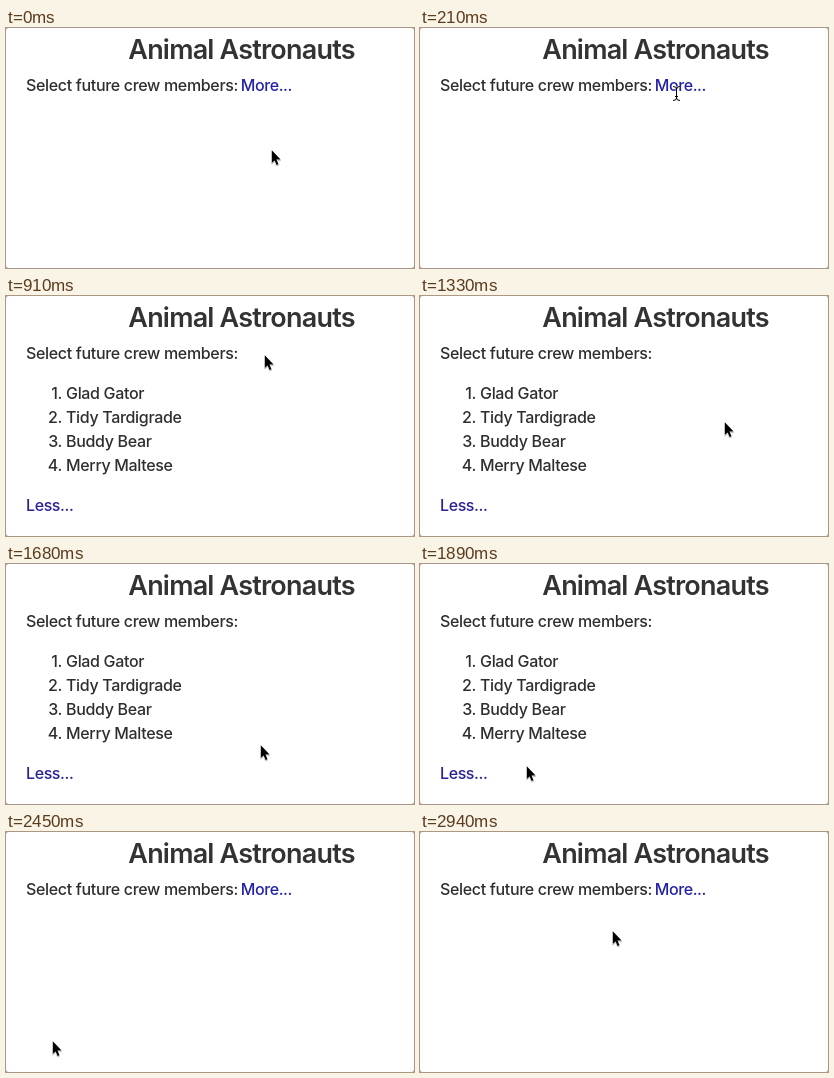
These frames come from a looping animation (408 by 240 pixels, 3.01 s). An HTML page:

```html
<!DOCTYPE html>
<html lang="en">
<head>
<meta charset="utf-8">
<title>Animal Astronauts</title>
<style>
  html, body { margin: 0; width: 100%; height: 100%; overflow: hidden; background: #a6a6a6; }
  svg { display: block; width: 100vw; height: 100vh; }
  text {
    font: 450 16px Inter, "Liberation Sans", sans-serif;
    font-optical-sizing: none;
    letter-spacing: -.33px;
    fill: #2e2e2e;
    white-space: pre;
  }
  .title { font-size: 27px; font-weight: 600; letter-spacing: -.8px; text-anchor: middle; fill: #333; }
  .number { text-anchor: end; }
  .link { fill: #2222a6; letter-spacing: -.4px; }
  #less { fill: #2a2394; }
  #arrow { filter: drop-shadow(0 1px .7px rgba(0, 0, 0, .25)); }
  #ring { fill: none; stroke: #777; stroke-width: 1.5; }
</style>
</head>
<body>
<svg viewBox="0 0 408 240">
  <defs>
    <path id="caret" d="M-3.5 -7Q0 -7 0 -4.5Q0 -7 3.5 -7M0 -4.5V4.5M-3.5 7Q0 7 0 4.5Q0 7 3.5 7M-1.5 3H1.5"/>
  </defs>
  <rect width="408" height="240" rx="3" fill="#fff"/>
  <text class="title" x="235.5" y="31">Animal Astronauts</text>
  <text x="20" y="63">Select future crew members:</text>
  <text class="link" id="more" x="234.7" y="63">More...</text>
  <g id="details">
    <g id="list"></g>
    <text class="link" id="less" x="20" y="215">Less...</text>
  </g>
  <g id="pointer">
    <circle id="ring" r="16.5"/>
    <path id="arrow" d="M.8 1.3V14L3.6 11.4 5.6 16 7.5 15.2 5.5 10.6H9.6Z"
          stroke="#fff" stroke-linejoin="round" paint-order="stroke"/>
    <g id="beam" fill="none" transform="translate(.5 -.5)">
      <use href="#caret" stroke="#fff" stroke-width="2" stroke-opacity=".6"/>
      <use href="#caret" stroke="#000"/>
    </g>
  </g>
</svg>
<script>
const LOOP = 3010, TICK = 70;
const $ = id => document.getElementById(id);

$('list').innerHTML = ['Glad Gator', 'Tidy Tardigrade', 'Buddy Bear', 'Merry Maltese']
  .map((name, i) => {
    const y = 103 + 24 * i;
    return `<text class="number" x="56" y="${y}">${i + 1}.</text><text x="60" y="${y}">${name}</text>`;
  }).join('');

const easeOut = power => p => 1 - (1 - p) ** power;
const linear = p => p;

// Each move follows a quadratic curve and rests at its end until the next one.
const moves = [
  { start: 0, end: 210, from: [265, 121], bend: [260, 92], to: [256, 66], ease: easeOut(1.4) },
  { start: 280, end: 420, from: [256, 66], bend: [257, 63], to: [258, 60], ease: linear },
  { start: 910, end: 910, from: [258, 58], bend: [258, 58], to: [258, 58], ease: linear },
  { start: 1120, end: 1470, from: [258, 58], bend: [302, 100], to: [320, 172], ease: p => p * p * (3 - 2 * p) },
  { start: 1610, end: 2100, from: [320, 172], bend: [183, 188], to: [46, 210], ease: easeOut(1.8) },
  { start: 2450, end: 2450, from: [46, 208], bend: [46, 208], to: [46, 208], ease: linear },
  { start: 2660, end: 2940, from: [46, 208], bend: [112, 165], to: [192, 98], ease: p => p ** 1.3 }
];

function pointerAt(t) {
  const { start, end, from, bend, to, ease } = moves.findLast(move => t >= move.start);
  const s = t >= end ? 1 : ease((t - start) / (end - start));
  return from.map((a, i) => (1 - s) ** 2 * a + 2 * s * (1 - s) * bend[i] + s * s * to[i]);
}

const within = (t, start, end) => t >= start && t < end;
const show = (id, visible) => $(id).setAttribute('visibility', visible ? 'visible' : 'hidden');

function draw() {
  const t = Math.floor(performance.now() % LOOP / TICK) * TICK;
  const open = within(t, 840, 2450);
  const overText = within(t, 210, 910) || within(t, 2030, 2450);
  show('more', !open);
  show('details', open);
  show('beam', overText);
  show('arrow', !overText);
  show('ring', within(t, 770, 840) || within(t, 2310, 2450));
  const [x, y] = pointerAt(t).map(Math.round);
  $('pointer').setAttribute('transform', `translate(${x} ${y})`);
  requestAnimationFrame(draw);
}
draw();
</script>
</body>
</html>
```
